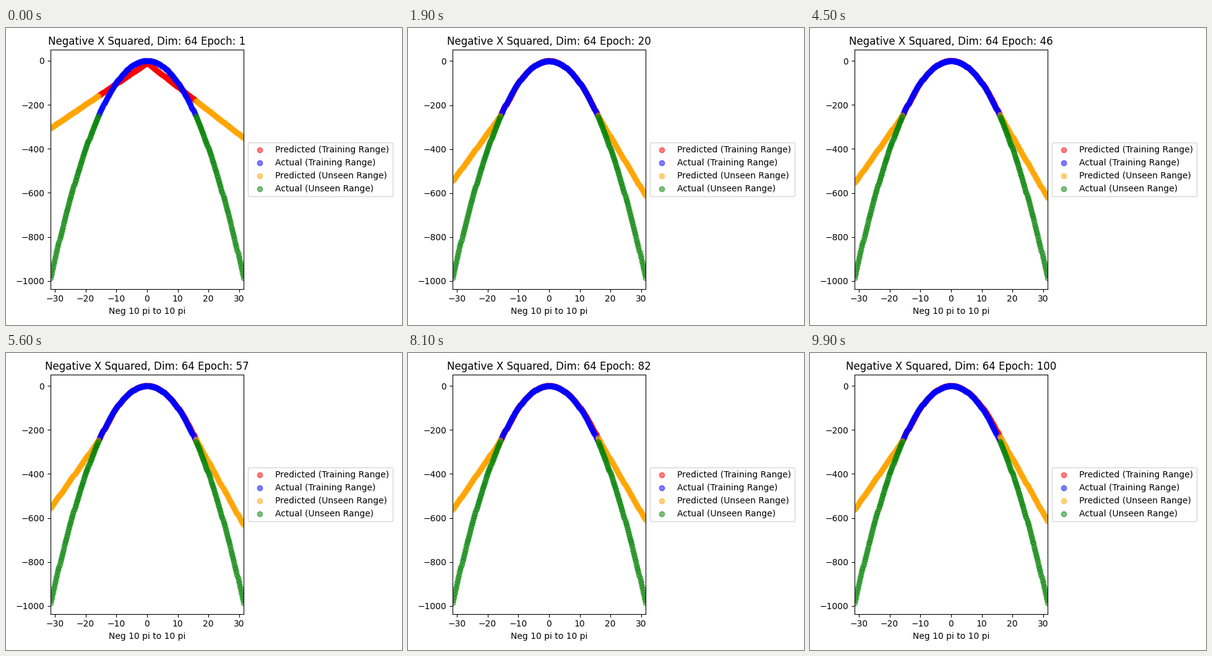
A matplotlib script that plays this animation: 640 by 480 pixels, repeating every 10 s.

```python
import numpy as np
import matplotlib.pyplot as plt
from matplotlib.animation import FuncAnimation

EPOCHS = 100
SPAN = 10 * np.pi
EDGE = SPAN / 2

x = np.linspace(-SPAN, SPAN, 300)
actual = -x**2
seen = np.abs(x) <= EDGE
wobble = np.random.default_rng(7).normal(size=(EPOCHS, 4))


def first_guess():
    return -10 - np.where(x < 0, 9.42, 10.82) * np.abs(x)


def fitted(epoch):
    """Curve that follows the parabola inside and runs straight outside."""
    t = epoch / EPOCHS
    w_left, w_edge, w_right, w_peak = wobble[epoch - 1]
    left = -530 - 33 * np.sqrt(t) + 5 * w_left
    right = -602 - 25 * np.sin(np.pi * t)**2 + 7 * w_right
    left_edge = -245
    right_edge = -244 + 17 * t**2 + 2 * w_edge
    peak = 0.8 + 0.8 * t + 0.5 * w_peak

    miss = np.where(x < 0, left_edge, right_edge) + EDGE**2
    inner = actual + miss * (np.abs(x) / EDGE)**3
    inner += peak * np.exp(-(x / 3)**2)
    inner -= 6 * np.exp(-((x + 12.8) / 1.5)**2)
    outer = np.interp(x, [-SPAN, -EDGE, EDGE, SPAN],
                      [left, left_edge, right_edge, right])
    return np.where(seen, inner, outer)


def predict(epoch):
    w = 1 - np.exp(-(epoch - 1) / 3)
    return w * fitted(epoch) + (1 - w) * first_guess()


fig, ax = plt.subplots(figsize=(6.4, 4.8), dpi=100)


def dots(color, label):
    return ax.scatter([], [], color=color, alpha=0.5, label=label)


pred_seen = dots("red", "Predicted (Training Range)")
true_seen = dots("blue", "Actual (Training Range)")
pred_far = dots("orange", "Predicted (Unseen Range)")
true_far = dots("green", "Actual (Unseen Range)")
ax.set_xlim(-SPAN, SPAN)
ax.set_xlabel("Neg 10 pi to 10 pi")
ax.legend(loc="center left", bbox_to_anchor=(1, 0.5))


def place(coll, y, mask):
    coll.set_offsets(np.column_stack([x[mask], y[mask]]))


def update(i):
    epoch = i + 1
    y = predict(epoch)
    place(pred_seen, y, seen)
    place(true_seen, actual, seen)
    place(pred_far, y, ~seen)
    place(true_far, actual, ~seen)
    low, high = actual.min(), max(actual.max(), y.max())
    pad = 0.05 * (high - low)
    ax.set_ylim(low - pad, high + pad)
    ax.set_title(f"Negative X Squared, Dim: 64 Epoch: {epoch}")
    return pred_seen, true_seen, pred_far, true_far


update(0)
fig.tight_layout()
fig.subplots_adjust(left=71.9 / 640, top=1 - 35.3 / 480)
anim = FuncAnimation(fig, update, frames=EPOCHS, interval=100,
                     repeat=True, repeat_delay=0, blit=False)
plt.show()
```
